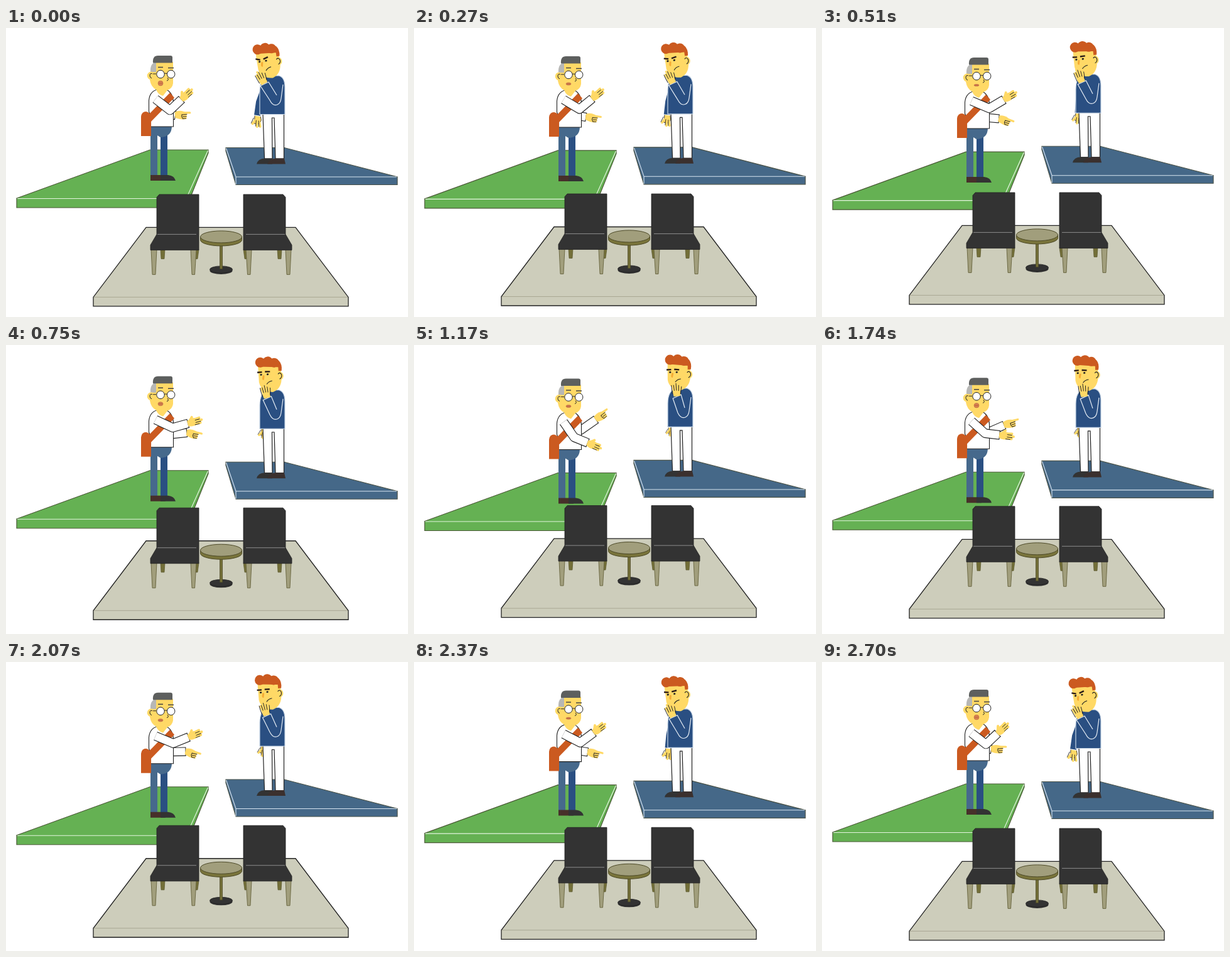
An HTML page with a canvas that plays this animation: 640x460 px, repeating every 2.73 s.

```html
<!DOCTYPE html>
<html lang="en">
<head>
<meta charset="utf-8">
<title>Two men on floating platforms</title>
<style>
html, body { margin: 0; width: 100%; height: 100%; overflow: hidden; background: #fff; }
canvas { display: block; }
</style>
</head>
<body>
<canvas id="stage" width="640" height="460"></canvas>
<script>
const ctx = document.getElementById('stage').getContext('2d');
const LOOP = 2730, STEP = 30, TALK = LOOP / 3;
const INK = '#222', SKIN = '#ffd966', DENIM = '#46698c', NAVY = '#2a4f82',
      RUST = '#cb5a20', COAL = '#333', WOOD = '#a19e7c', BARK = '#736f38';

function shape(d, fill, stroke, width = 1.2) {
  const path = new Path2D(d);
  if (fill) { ctx.fillStyle = fill; ctx.fill(path); }
  if (stroke) { ctx.strokeStyle = stroke; ctx.lineWidth = width; ctx.stroke(path); }
}

function oval(x, y, rx, ry, fill, stroke, width = 1.2) {
  shape(`M${x - rx} ${y}a${rx} ${ry} 0 1 0 ${2 * rx} 0a${rx} ${ry} 0 1 0 ${-2 * rx} 0Z`, fill, stroke, width);
}

function group(x, y, angle, draw, scale = 1) {
  ctx.save();
  ctx.translate(x, y);
  ctx.rotate(angle * Math.PI / 180);
  ctx.scale(scale, scale);
  draw();
  ctx.restore();
}

// Quadratic through a, b, c at u = 0, 0.5, 1
const blend = (a, b, c, u) => 2 * (u - .5) * (u - 1) * a + 4 * u * (1 - u) * b + 2 * u * (u - .5) * c;
const joint = (a, b, c, u) => [blend(a[0], b[0], c[0], u), blend(a[1], b[1], c[1], u)];
const heading = (a, b) => Math.atan2(b[1] - a[1], b[0] - a[0]) * 180 / Math.PI;

function sleeve(shoulder, elbow, wrist, width, fill, edge) {
  const a = heading(elbow, wrist) * Math.PI / 180;
  const tip = [wrist[0] + 1.1 * Math.cos(a), wrist[1] + 1.1 * Math.sin(a)];
  ctx.lineJoin = 'round';
  shape(`M${shoulder}L${elbow}L${tip}`, null, edge, width + 2.2);
  shape(`M${shoulder}L${elbow}L${wrist}`, null, fill, width);
  ctx.lineJoin = 'miter';
}

function openHand() {
  ctx.lineCap = 'round';
  shape('M0 -4Q6 -7 12 -6L17 -1L15 5Q6 8 0 4Z', SKIN);
  shape('M5 -4L9 -8M12 -3.5L20 -4M13 0L23 0M12 3.5L20 4', null, SKIN, 4);
  shape('M13 -2L20 -2M13 1.8L21 2M11 5L18 5.2', null, INK, .9);
  ctx.lineCap = 'butt';
}

function pointingHand() {
  ctx.lineCap = 'round';
  shape('M0 -5Q7 -8 14 -5L19 -2L18 7Q10 9 0 4Z', SKIN);
  shape('M13 -3L24 -2', null, SKIN, 3.2);
  shape('M11 0L19 0M12 3.2L18 3.2M12 6.4L17 6.4M11 0Q9 3 12 6.4', null, INK, .9);
  ctx.lineCap = 'butt';
}

function greenPlatform() {
  const edge = '#4b5a37', fill = '#65b153';
  shape('M17 271L229 194H322V199L287 286H17Z', fill, edge);
  shape('M18 271.5H287L321.5 195M287 272V285', null, '#e4f5df', 1.2);
}

function bluePlatform() {
  shape('M350 190.5H443L623 237V249.5H366L350 196Z', '#456888', '#4b5348');
  shape('M350.5 191.5L366 237H622M366 237V249', null, '#d8e5f2', 1.1);
}

function teacherHead(mouth) {
  shape('M238 54H266V88Q265 96 257 99L250 108Q242 106 239 98Q231 94 229 83Z', SKIN);
  shape('M230 70Q229 56 239 54V70Z', '#b7b7b5');
  oval(231, 76, 6.3, 6.5, SKIN);
  shape('M233 73Q229 71 229 76Q229 79 232 80', null, INK, 1);
  shape('M234 55.5Q233 44 242 44H262Q265 44 265 47V55.5Z', '#5d5f5e');
  shape('M242 62.5H250M258 63.5H267', null, '#444', 1.5);
  shape('M252 73Q254 71 257 73M239 73H234', null, INK, 1);
  oval(246, 73.5, 6.2, 6.3, '#fff', INK, 1);
  oval(262.7, 73.5, 6.2, 6.3, '#fff', INK, 1);
  shape('M257 79Q260 83 256 84', null, INK, 1);
  oval(246, 88, 4, 1.5 + 2.4 * mouth ** 1.5, '#d8804f', '#bd7048', .7);
  shape('M243 88H249', null, '#a85a3c', .7);
}

function teacher(u, mouth) {
  const farElbow = joint([252, 136], [260, 138], [266, 124], u);
  const farWrist = joint([269, 139], [286, 137], [289, 105], u);
  sleeve([256, 115], farElbow, farWrist, 12, '#fff', INK);
  group(...farWrist, -blend(5, -12, 48, u), pointingHand);

  shape('M246 165H257V236H246Z', NAVY);
  shape('M230 156H264Q264 173 246 174L241 171V236H230Z', DENIM);
  shape('M230 234H246Q252 235 254 243H230Z', '#47302a');
  shape('M246 234H258Q268 235 270 243H246Z', COAL);

  shape('M230.5 157V140L227.5 133V115Q229 99 245 97H254Q266 103 266.5 118V157Z', '#fff', INK, 1.1);
  shape('M261 103L268 111L229 151L226 139Z', RUST);
  shape('M215 172V141Q216 133 223 133Q231 134 231 145V172Z', RUST);
  teacherHead(mouth);

  const elbow = joint([261, 131], [266, 125], [253, 140], u);
  const wrist = joint([279, 114], [290, 116], [273, 151], u);
  sleeve([238, 113], elbow, wrist, 12.5, '#fff', INK);
  group(...wrist, heading(elbow, wrist), openHand);
}

function thinkerHead(u) {
  shape('M404 35H440V60Q438 75 425 79Q406 77 404 62Z', SKIN);
  oval(408, 30.5, 8, 8, RUST);
  oval(420, 29.5, 8, 7.5, RUST);
  oval(430, 32.5, 8, 7.5, RUST);
  shape('M404 32L438 30Q443 36 441 46H436V40L404 37Z', RUST);
  oval(437.5, 54, 6, 6.5, SKIN);
  shape('M435 51Q438 47 440.5 52Q441.5 57 437 59', null, INK, 1.1);
  const frown = 22 * (1 - u) ** 3;
  group(406, 46.2, frown - 3, () => shape('M-3.7 0H3.7', null, '#2b1d18', 2.4));
  group(418.5, 46, -frown + 5, () => shape('M-4 0H4', null, '#2b1d18', 2.4));
  oval(408, 50.3, 1.7, 1.4, INK);
  oval(418.5, 50.3, 1.7, 1.4, INK);
  shape('M411 51Q407.5 59 412 59L413.5 52Z', '#f5ac35');
  shape('M416 66Q419 61.5 425 61', null, INK, 1.1);
}

function raisedHand() {
  ctx.lineCap = 'round';
  shape('M0 -6Q7 -8 13 -6V5Q6 8 0 6Z', SKIN);
  shape('M10 -5L20 -6M11 -1.5L25 -2M11 2L24 3M8 5L16 8', null, SKIN, 4);
  shape('M11 -4L21 -4.5M11 0L24 .3M10 4L20 5M5 -8L13 -8.5L21 -8.5M4 7L12 9L17 10', null, INK, 1.1);
  ctx.lineCap = 'butt';
}

function hangingHand() {
  ctx.lineCap = 'round';
  shape('M0 -5L8 -6L14 -3L13 5L0 4Z', SKIN, INK, .8);
  shape('M8 4L13 8M11 -3L18 -4M12 1L18 1', null, SKIN, 3.8);
  shape('M9 -2L18 -2M8 2L17 3M4 6L12 10', null, INK, .9);
  ctx.lineCap = 'butt';
}

function thinker(u) {
  const farWrist = joint([400, 139], [410, 137], [408, 138], u);
  group(...farWrist, blend(88, 94, 92, u), hangingHand, 1 - .25 * u);
  sleeve([411, 96], [blend(403, 411, 411, u), 118], farWrist, 10, NAVY, '#fff');

  shape('M409 137L411.5 208H424L423.5 143L427 143L429 208H442.5V137Z', '#fff', INK);
  shape('M399 216.5Q401 208 412 207.5H424V216.5Z', COAL);
  shape('M416 216.5Q419 208 430 207.5H443L445 216.5Z', '#3b302e');
  shape('M404 137.5V100Q404 80 417 76H435Q444 79 444 94V137.5Z', NAVY, '#c9d7e6', 1.2);

  group(428, 80, -9 * (1 - u), () => {
    ctx.translate(-428, -80);
    thinkerHead(u);
  });

  const x = 411 + 7.5 * u;
  shape(`M${x - 6} 92L420 115Q425 125 432 122Q437 120 438 112L441 90L431 107L${x + 7} 86Z`, NAVY);
  shape(`M431 107L${x + 7} 86L${x - 6} 92L420 115Q425 125 432 122Q437 120 438 112L441 90`, null, '#e6edf5', 1.2);
  group(x + .5, 88.5, -118 + 24 * u, raisedHand, .85);
}

function chair() {
  shape('M246 352H253L252 367H247ZM302 352H307L305 367H302Z', BARK, '#59562f', .7);
  shape('M231 352H240L238 392H233ZM294 352H303L300.5 392H296Z', WOOD, '#66633d', .9);
  shape('M240 269L244 264.5H307V353H230V345L240 328Z', COAL, '#222', .8);
  shape('M241 328H303', null, '#8c8c8c', 1);
}

function table() {
  oval(342.5, 386, 18, 5.5, COAL);
  oval(342.5, 384, 18, 5.5, COAL, '#222', .8);
  shape('M340.5 342H344.5V383H340.5Z', BARK, '#4d4a28', .8);
  shape('M309.5 332V337A33 9.5 0 0 0 375.5 337V332Z', '#79743b', '#4d4a28', 1);
  oval(342.5, 332, 33, 9.5, WOOD, '#4d4a28', 1);
}

function room() {
  shape('M223 317H461L545 428V442.5H139V428Z', '#cdcdbb', INK, 1.3);
  shape('M140 428H544', null, '#a9a793', 1);
  chair();
  ctx.save();
  ctx.translate(685, 0);
  ctx.scale(-1, 1);
  chair();
  ctx.restore();
  table();
}

function shifted(dy, draw) {
  group(0, dy, 0, draw);
}

function render(now) {
  const t = Math.floor(now % LOOP / STEP) * STEP;
  const u = (1 - Math.cos(2 * Math.PI * t / LOOP)) / 2;
  const mouth = (1 + Math.cos(2 * Math.PI * t / TALK)) / 2;
  ctx.fillStyle = '#fff';
  ctx.fillRect(0, 0, 640, 460);
  shifted(10 * u, () => { greenPlatform(); teacher(u, mouth); });
  shifted(-7.4 * u, () => { bluePlatform(); thinker(u); });
  shifted(.4 - 9.8 * u, room);
}

function tick() {
  render(performance.now());
  requestAnimationFrame(tick);
}
tick();
</script>
</body>
</html>
```
